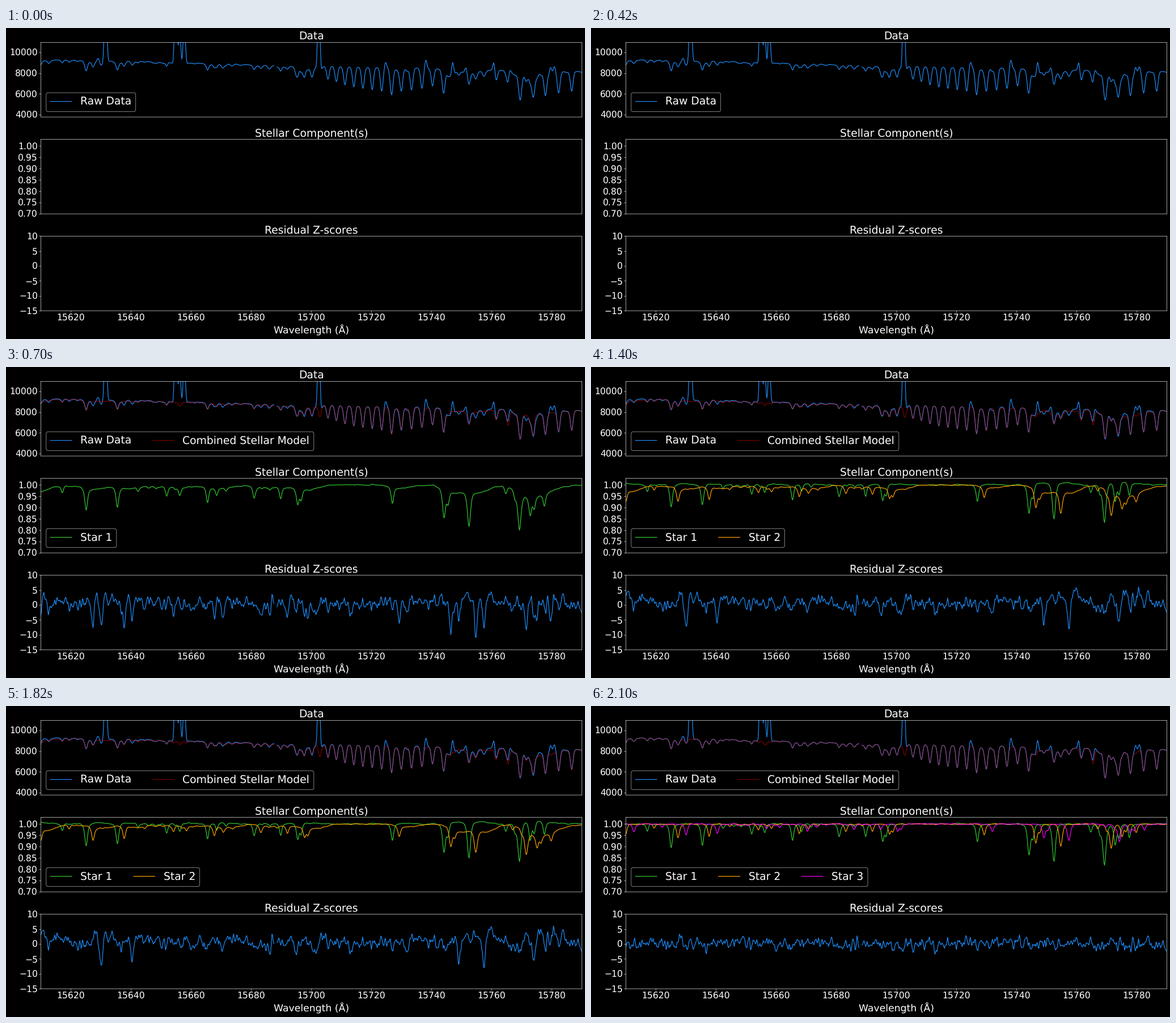
A matplotlib script that plays this animation: 1021 px wide and 549 px high, repeating every 2800 ms.

```python
import numpy as np
import matplotlib.pyplot as plt
from matplotlib.animation import FuncAnimation

W, H, DPI = 1021, 549, 56.4
LEFT, RIGHT = 61, 1015             # stage x of the plot edges
X = np.linspace(LEFT, RIGHT, 860)  # samples, in stage pixels
WAVE = 15610 + (X - LEFT) * 180 / (RIGHT - LEFT)
GAP = (X > 472.4) & (X < 476.8)    # between the two detectors

rng = np.random.default_rng(12)


def smooth(y, s):
    n = int(4 * s) + 1
    k = np.exp(-0.5 * (np.arange(-n, n + 1) / s) ** 2)
    return np.convolve(np.pad(y, n, mode="edge"), k / k.sum(), "valid")


def noise(std, s):
    y = smooth(rng.normal(size=X.size), s)
    return y * std / y.std()


def bell(centre, width):
    return np.exp(-0.5 * ((X - centre) / width) ** 2)


# Stellar absorption: position -> depth, with faint random lines added.
LINES = {
    49: .075, 99: .035, 141: .105, 196: .095, 283: .046, 306: .036,
    355: .073, 371: .034, 437: .055, 484: .058, 514: .073, 520: .05,
    681: .078, 772: .135, 779: .055, 816: .165, 881: .035, 897: .035,
    905: .18, 924: .09, 931: .055, 949: .06,
}
LINES.update(zip(rng.uniform(200, 480, 10), rng.uniform(.004, .02, 10)))


def star(shift, scale):
    """The same line pattern, Doppler shifted and diluted."""
    depth = sum(d * (1 + ((X - shift - c) / (1.9 + 6 * d)) ** 2 / 3) ** -2
                for c, d in LINES.items())
    return 1 - scale * depth + noise(.0012, 2)


ONE, TWO, THREE = STARS = [star(0, 1), star(12, .6), star(26.3, .44)]

# A fit with too few stars smears the missing lines into a broad sag.
SAG = smooth(TWO * THREE, 13)
FITS = [
    [],
    [ONE ** .95 * SAG],
    [ONE ** .95 * SAG ** -.3, TWO * np.interp(X - 12, X, SAG)],
    STARS,
]

# Observed flux: continuum, two molecular bands of the air, stars, sky glow.
continuum = smooth(np.interp(X, [61, 300, 480, 700, 1015],
                             [9270, 9080, 8690, 8470, 8080]), 20)
n, m = np.arange(17), np.arange(7)
centres = np.r_[512 + 13.06 * n + .195 * n ** 2, 864 + 21 * m + .2 * m ** 2]
depths = np.r_[2250 * np.exp(-((n - 10.5) / 8.5) ** 2),
               1900 * (1 - np.exp(-(m + 1) / 1.3))]
air = sum(d * bell(c, 2.3) for c, d in zip(centres, depths))
FULL = np.prod(STARS, axis=0)
FLUX = (continuum - air) * FULL + noise(25, 3)

GLOW = {162: 320, 175.2: 9900, 299: 12000, 306: 3500, 314: 4500, 551.3: 9500,
        669: 580, 740: 900, 787: 1100, 811: 500, 860: 900, 887: 800,
        960: 800, 966.5: 550}
RAW = FLUX + sum(a * bell(c, 1.8) for c, a in GLOW.items())

MODELS = [FLUX * np.prod(fit, axis=0) / FULL for fit in FITS]
GRAIN = .2 + noise(1.1, .9)
SIGMA = 50

plt.style.use("dark_background")
plt.rcParams.update({
    "font.family": "DejaVu Sans", "axes.titlesize": 24, "axes.labelsize": 22,
    "xtick.labelsize": 20, "ytick.labelsize": 20, "legend.fontsize": 24,
    "text.hinting": "none", "path.snap": False,
})
# The small margin keeps the pixel size from rounding down.
fig = plt.figure(figsize=((W + .01) / DPI, (H + .01) / DPI), dpi=DPI)
PANELS = [
    ("Data", (3765, 10957), np.arange(4000, 10001, 2000)),
    ("Stellar Component(s)", (.7, 1.03), np.arange(14, 21) / 20),
    ("Residual Z-scores", (-15, 10), np.arange(-15, 11, 5)),
]
axes = [fig.add_axes([61.4 / W, 1 - (157.1 + 171 * i) / H, 954 / W, 131.6 / H])
        for i in range(3)]
STAR_COLORS = ["limegreen", "orange", "magenta"]


def trace(ax, y, color, **kw):
    ax.plot(WAVE, np.where(GAP, np.nan, y), color=color, **kw)


def draw(step):
    for ax in axes:
        ax.clear()
    data, parts, resid = axes
    trace(data, RAW, "dodgerblue", label="Raw Data")
    if step:
        trace(data, MODELS[step], "red", alpha=.5,
              label="Combined Stellar Model")
        for i, y in enumerate(FITS[step]):
            parts.plot(WAVE, y, color=STAR_COLORS[i], label=f"Star {i + 1}")
        parts.legend(loc="lower left", ncol=3)
        trace(resid, (FLUX - MODELS[step]) / SIGMA + GRAIN, "dodgerblue")
    data.legend(loc="lower left", ncol=3)
    for ax, (title, limits, ticks) in zip(axes, PANELS):
        ax.set(title=title, xlim=(15610, 15790), ylim=limits, yticks=ticks,
               xticks=[])
    resid.set_xticks(np.arange(15620, 15781, 20))
    resid.set_xlabel("Wavelength (Å)")
    return axes


anim = FuncAnimation(fig, draw, frames=4, interval=700, repeat=True)
plt.show()
```
